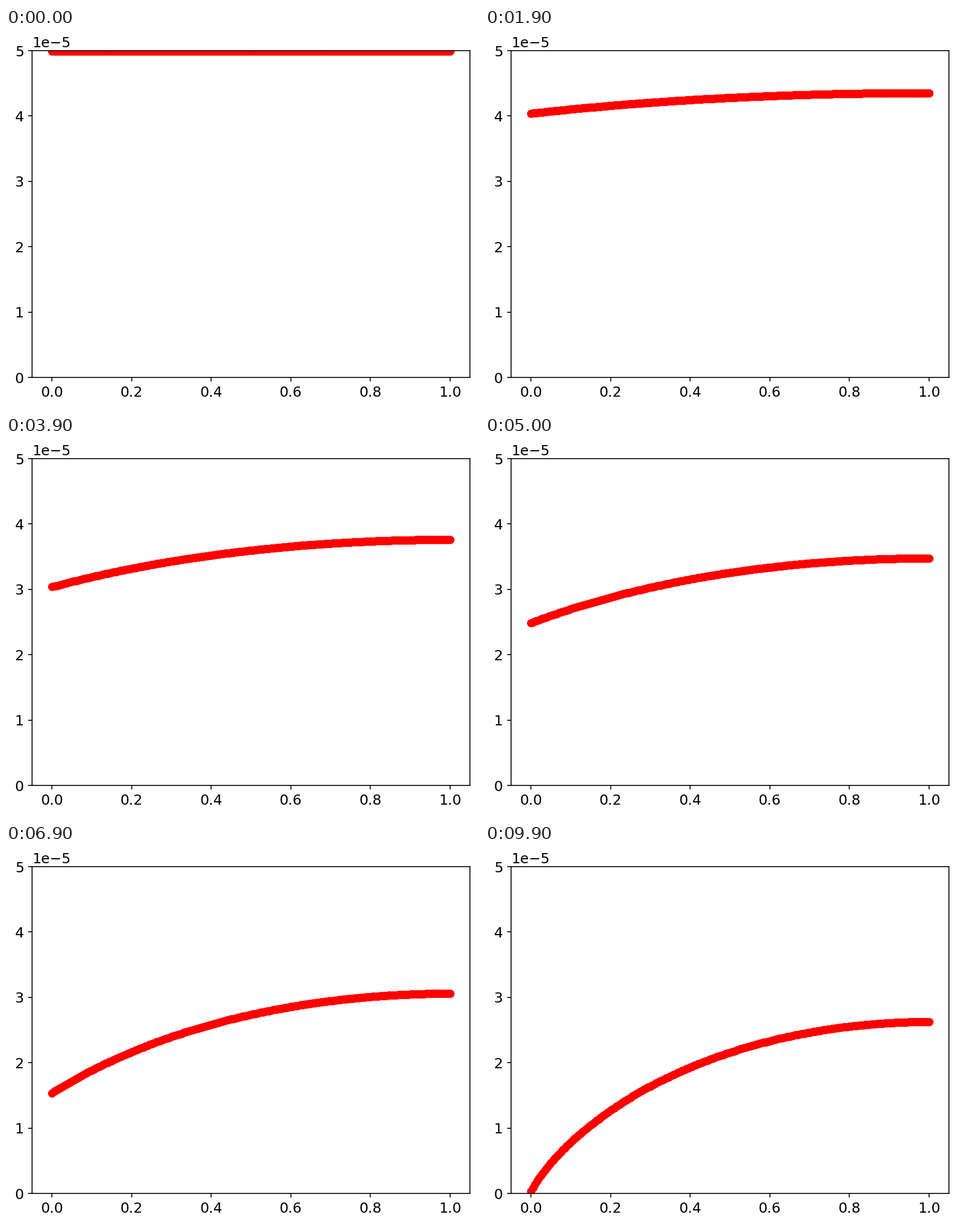
Animation of 835 by 671 pixels, one loop 10 s. Source, as a matplotlib script:

```python
import numpy as np
import matplotlib.pyplot as plt
from matplotlib.animation import FuncAnimation

W, H, DPI = 835, 671, 150
FRAMES, INTERVAL = 100, 100
STEPS_PER_FRAME = 5
R0 = 5e-5            # initial pore radius
R_END = 2.626e-5     # radius left at the closed end
LOSS = 0.002002      # share of R0 deposited per step at the open end
N = 200

x = np.linspace(0, 1, N + 1)


def concentration(r, k):
    """Solve c'' = k c / r^2 with c(0) = 1 and c'(1) = 0."""
    g = (k / N**2 / r**2).tolist()
    c = [1.0, 1 + g[N] / 2]
    for i in range(N - 1, 0, -1):
        c.append((2 + g[i]) * c[-1] - c[-2])
    c = np.array(c[::-1])
    return c / c[0]


def simulate(k):
    """Relative pore radius along x, one row per frame."""
    r = np.ones(N + 1)
    rows = []
    for step in range(STEPS_PER_FRAME * (FRAMES - 1) + 1):
        r = r - LOSS * concentration(r, k)
        if step % STEPS_PER_FRAME == 0:
            rows.append(r)
    return np.array(rows)


def fit_modulus(lo=0.4, hi=1.4):
    """Bisect for the reaction modulus that leaves R_END at x = 1."""
    for _ in range(16):
        mid = (lo + hi) / 2
        if simulate(mid)[-1, -1] * R0 < R_END:
            lo = mid
        else:
            hi = mid
    return (lo + hi) / 2


radius = R0 * simulate(fit_modulus())

plt.rcParams.update({"font.family": "DejaVu Sans", "font.size": 12,
                     "xtick.labelsize": 12, "ytick.labelsize": 12})

# the small surplus guards against rounding down a pixel
fig = plt.figure(figsize=((W + 0.01) / DPI, (H + 0.01) / DPI), dpi=DPI,
                 facecolor="white")
ax = fig.add_axes([46 / W, 54 / H, 773 / W, 577 / H])
ax.set_xlim(-0.05, 1.05)
ax.set_ylim(0, R0)
dots, = ax.plot(x, radius[0], "o", color="#ff0000", markersize=6)


def update(n):
    dots.set_ydata(radius[n])
    return dots,


anim = FuncAnimation(fig, update, frames=FRAMES, interval=INTERVAL,
                     repeat=True, repeat_delay=0, blit=False)
plt.show()
```
